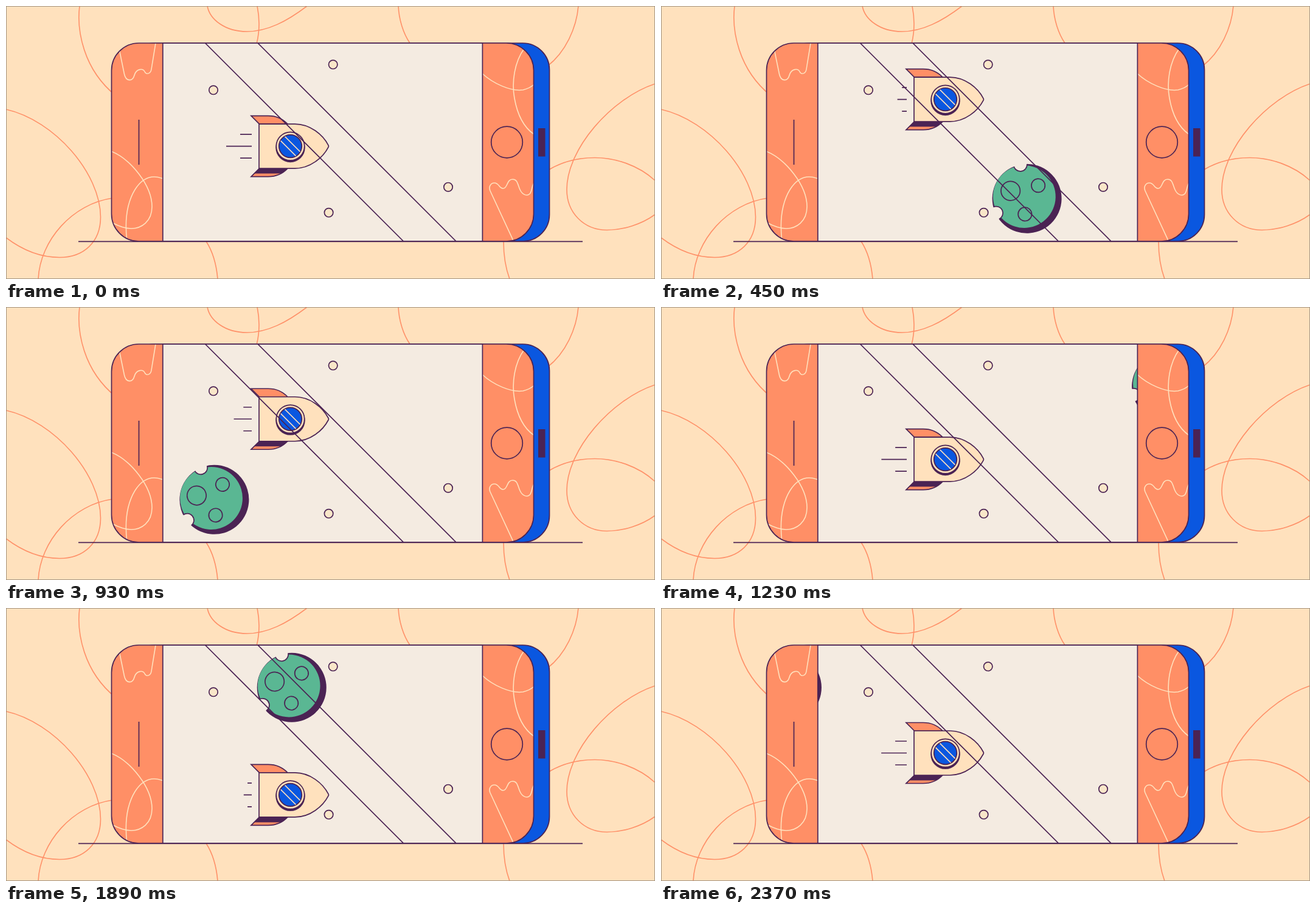
These frames come from a looping animation (1067 px wide and 449 px high, 2400 ms). An HTML page:

```html
<!DOCTYPE html>
<html lang="en">
<head>
<meta charset="utf-8">
<title>Rocket on a phone</title>
<style>
  html, body { margin: 0; width: 100%; height: 100%; overflow: hidden; background: #ffe1bd; }
  svg { display: block; width: 100%; height: 100%; }
  .ink { stroke: #4b2354; stroke-width: 1.7; }
  .none { fill: none; }
  .dark { fill: #4b2354; }
  .orange { fill: #ff8f66; }
  .blue { fill: #0a57e0; }
  .cream { fill: #ffe1bd; }
  .screen { fill: #f4ebe1; }
  .green { fill: #5ab793; }
  .swirl { fill: none; stroke: #ff9068; stroke-width: 1.6; }
  .light { fill: none; stroke: #ffe1bd; stroke-width: 1.6; }
</style>
</head>
<body>
<svg viewBox="0 0 1067 449" preserveAspectRatio="none">
  <defs>
    <clipPath id="front"><rect x="173.5" y="61" width="694" height="326" rx="45"/></clipPath>
    <clipPath id="view"><rect x="257.5" y="61" width="526" height="326"/></clipPath>
    <clipPath id="glass"><circle r="18.3"/></clipPath>
    <clipPath id="globe"><circle r="56.8"/></clipPath>
    <mask id="bites" maskUnits="userSpaceOnUse" x="-60" y="-60" width="120" height="120">
      <rect x="-60" y="-60" width="120" height="120" fill="#fff"/>
      <circle cx="-6.3" cy="-56.6" r="11"/>
      <circle cx="-52.3" cy="19.7" r="11"/>
    </mask>
  </defs>

  <rect class="cream" width="1067" height="449"/>
  <g class="swirl">
    <path d="M121 0C116 40 127 104 180 147"/>
    <path d="M331 0C335 22 360 42 396 42C430 42 462 25 495 0"/>
    <path d="M413 0C417 20 417 42 412 62"/>
    <path d="M645 0C646 22 653 45 664 61"/>
    <path d="M941 0C938 36 920 76 890 99"/>
    <path d="M0 170C80 188 155 275 155.5 347C155.5 388 128 413.5 88 413.5C55 413.5 25 400 0 381"/>
    <path d="M53 449C56 385 110 325 175 316"/>
    <path d="M329 387C340 404 346 425 348 449"/>
    <path d="M818 387C818 410 821 430 828 449"/>
    <path d="M1067 128C995 152 922 235 922 302C922 340 950 368.5 988 368.5C1015 368.5 1045 359 1067 343"/>
    <path d="M893 269C915 256 942 249.5 968 249.5C1002 249.5 1040 262 1067 287"/>
  </g>

  <!-- phone -->
  <rect class="ink blue" x="200" y="61" width="693.5" height="326" rx="44"/>
  <rect class="dark" x="875" y="201" width="11.5" height="46.5"/>
  <rect class="orange" x="173.5" y="61" width="694" height="326" rx="45"/>
  <g class="light" clip-path="url(#front)">
    <path d="M183 56L194.5 112C197 124 208 125 211 114C214 103 225 102 228 108C231 114 238 111 239 104L246 61"/>
    <path d="M173 239C205 252 240 295 240 330C240 355 222 366 206 366C195 366 183 361 174 356"/>
    <path d="M258 284C240 277 224 283 212 302C198 325 195 355 199 388"/>
    <path d="M852 70C836 92 831 125 836 152C841 180 852 200 868 211"/>
    <path d="M783 111C800 127 830 141 850 138C858 136 864 133 868 129"/>
    <path d="M835 388L796 304C793 297 797 291 803 291C811 291 811 301 818 300C825 299 823 285 833 285C841 285 841 293 845 302C849 311 857 313 861 309C865 305 864 297 868 291"/>
  </g>
  <rect class="ink none" x="173.5" y="61" width="694" height="326" rx="45"/>
  <path class="ink" d="M218.5 187V261"/>
  <circle class="ink none" cx="823.5" cy="224" r="25.8"/>
  <rect class="screen" x="257.5" y="61" width="526" height="326"/>

  <!-- scene -->
  <g clip-path="url(#view)">
    <g class="ink" fill="#f9e6c9">
      <circle cx="341" cy="138.3" r="7.2"/>
      <circle cx="537.7" cy="96.3" r="7.2"/>
      <circle cx="727" cy="297.7" r="7.2"/>
      <circle cx="530.6" cy="339.8" r="7.2"/>
    </g>
    <g id="planet">
      <g mask="url(#bites)">
        <circle class="dark" r="57"/>
        <circle class="green" cx="-4" cy="-3.6" r="51.4"/>
      </g>
      <g class="ink none" clip-path="url(#globe)">
        <circle cx="-6.3" cy="-56.6" r="11"/>
        <circle cx="-52.3" cy="19.7" r="11"/>
      </g>
      <g class="ink none">
        <circle cx="-25.8" cy="-14.8" r="15.7"/>
        <circle cx="20.2" cy="-20" r="11.2"/>
        <circle cx="-5.3" cy="25.2" r="11.2"/>
      </g>
    </g>
    <g id="rocket">
      <path id="trails" class="ink none"/>
      <path class="ink orange" d="M403 -50H431C444 -50 455 -45 463 -36.5H416.5Z"/>
      <path class="ink orange" d="M403 50H431C444 50 455 45 463 36.5H416.5Z"/>
      <path class="dark" d="M416.5 36.5L408 45H452Q458 42 463 36.5Z"/>
      <path class="ink cream" d="M416 -36.5H475C500 -36.5 521 -19 530 -1.5Q530.8 0 530 1.5C521 19 500 36.5 475 36.5H416Z"/>
      <g transform="translate(467.5 0)">
        <circle class="dark" cy="2.4" r="24.2"/>
        <circle class="ink cream" r="23.2"/>
        <circle class="ink blue" r="18.8"/>
        <path class="light" clip-path="url(#glass)" d="M-13 -20L20 13M-20 -13L13 20"/>
      </g>
    </g>
    <path class="ink" d="M327.5 61L653.5 387M414 61L740 387"/>
  </g>
  <rect class="ink none" x="257.8" y="61" width="525.6" height="326"/>
  <path class="ink" d="M119 387.3H948"/>
  <rect x=".5" y=".5" width="1066" height="448" fill="none" stroke="#a59683"/>
</svg>
<script>
const LOOP = 2400, STEP = 30, HALF = LOOP / 2;
const TOP = 149.5, BOTTOM = 308.5, PEAK = 606;
const [planet, rocket, trails] =
  ['planet', 'rocket', 'trails'].map(id => document.getElementById(id));

// cubic-bezier(x1, 0, x2, 1)
function ease(x, x1, x2) {
  let lo = 0, hi = 1;
  for (let i = 0; i < 24; i++) {
    const u = (lo + hi) / 2, v = 1 - u;
    if (3 * v * v * u * x1 + 3 * v * u * u * x2 + u * u * u < x) lo = u;
    else hi = u;
  }
  return lo * lo * (3 - 2 * lo);
}

const mix = (a, b, k) => a + (b - a) * k;

function rocketY(t) {
  const p = (t - PEAK + LOOP) % LOOP / HALF;
  return p < 1 ? mix(TOP, BOTTOM, ease(p, 0.333, 0.5))
               : mix(BOTTOM, TOP, ease(p - 1, 0.5, 0.5));
}

// 1 at full speed, 0 at the turning points
function thrust(t) {
  const p = (t + 8) % HALF / (HALF / 2);
  return ease(p < 1 ? 1 - p : p - 1, 0.333, 0.667);
}

function draw(t) {
  rocket.setAttribute('transform', `translate(0 ${rocketY(t)})`);
  const k = thrust(t), long = 404 - mix(11, 42, k), short = 404 - mix(6, 19, k);
  trails.setAttribute('d', `M${short} -19.5H404M${long} 0H404M${short} 19.5H404`);

  const first = t < HALF, s = t % HALF;
  const x = first ? 844.6 - 0.54 * s : 847.5 - 0.5475 * s;
  const y = first ? 316.8 : 130.8;
  planet.setAttribute('transform', `translate(${x} ${y}) rotate(${(270 - s) * 0.0253})`);
}

const start = performance.now();
function tick() {
  const t = (performance.now() - start) % LOOP;
  draw(Math.floor(t / STEP) * STEP);
  requestAnimationFrame(tick);
}
tick();
</script>
</body>
</html>
```
